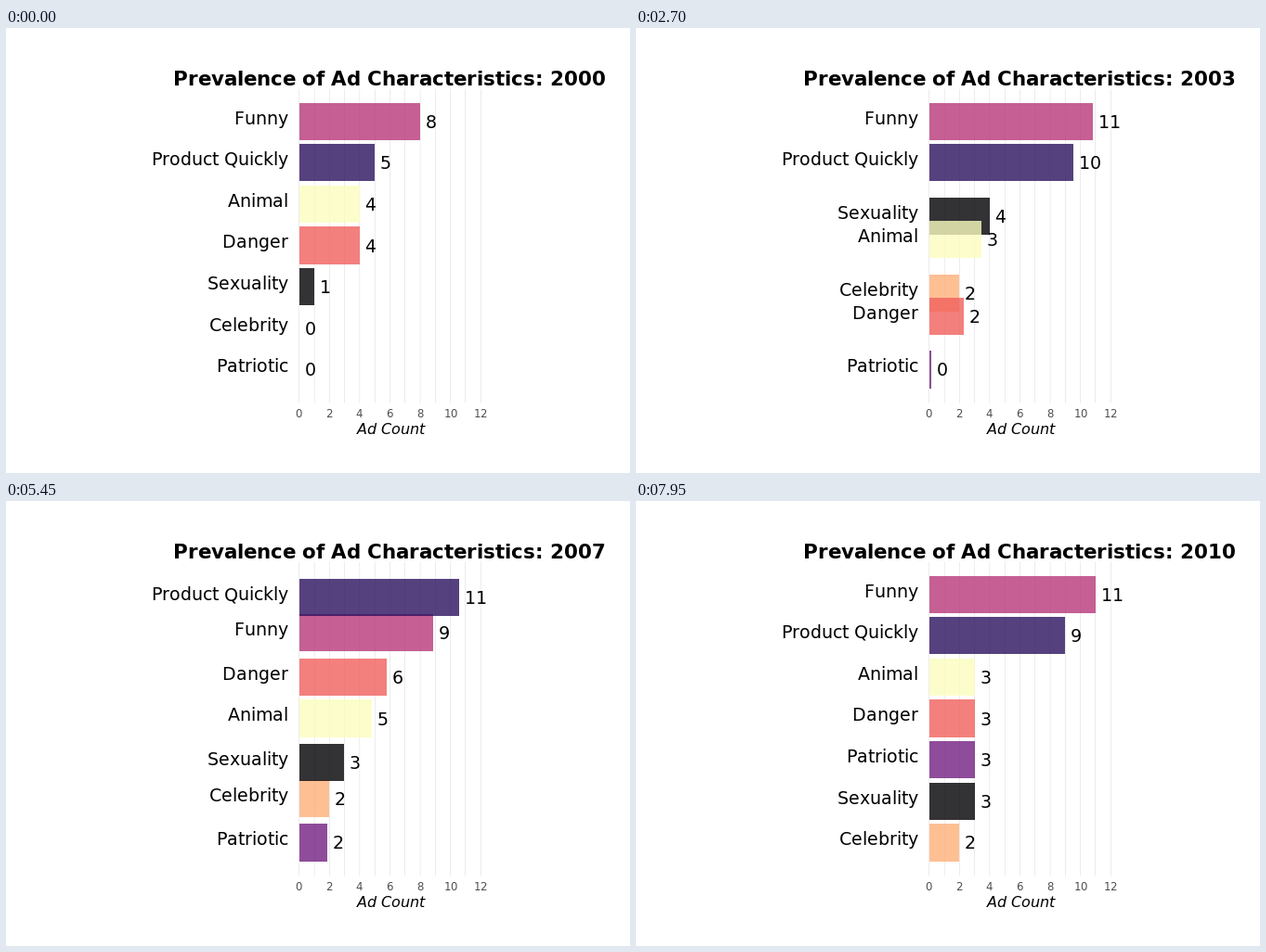
Recreate the animation shown at these times as a matplotlib script. Size 672x480 px, loop 8000 ms.

```python
import math

import matplotlib.pyplot as plt
from matplotlib.animation import FuncAnimation
from matplotlib.patches import Rectangle
from matplotlib.textpath import TextPath

plt.rcParams["font.family"] = "DejaVu Sans"

WIDTH, HEIGHT, DPI = 672, 480, 96
X0, UNIT = 315.8, 16.28            # zero of the count axis, pixels per ad
ROW1, ROW_STEP = 100.63, 44.64     # centre of the top row, row spacing
BAR_H = 0.9 * ROW_STEP
PANEL_TOP, PANEL_BOTTOM = 65.7, 404.5
LAST_TICK = 12
CYCLE, MOVE_START, MOVE_STEPS = 16, 3, 12
FIRST_YEAR = 2000

# Ads per year, listed from the dark to the light end of the colour map.
COUNTS = {
    "Sexuality": [1, 6, 6, 4, 4, 8, 2, 3, 4, 2, 3],
    "Product Quickly": [5, 4, 7, 10, 7, 8, 5, 11, 11, 12, 9],
    "Patriotic": [0, 1, 1, 0, 1, 0, 0, 2, 3, 4, 3],
    "Funny": [8, 10, 8, 11, 10, 11, 7, 9, 11, 11, 11],
    "Danger": [4, 4, 4, 2, 4, 1, 3, 6, 4, 7, 3],
    "Celebrity": [0, 6, 2, 2, 2, 6, 2, 2, 5, 2, 2],
    "Animal": [4, 3, 3, 3, 6, 6, 2, 5, 3, 5, 3],
}
YEARS = len(COUNTS["Funny"])


def ranking(year):
    """Row of every series: by count, ties in alphabetical order."""
    order = sorted(COUNTS, key=lambda name: (-COUNTS[name][year], name))
    return {name: row for row, name in enumerate(order)}


RANKS = [ranking(year) for year in range(YEARS)]

fig = plt.figure(figsize=(WIDTH / DPI, HEIGHT / DPI), dpi=DPI, facecolor="white")
ax = fig.add_axes([0, 0, 1, 1])
ax.set_xlim(0, WIDTH)
ax.set_ylim(HEIGHT, 0)
ax.axis("off")


class Label:
    """A line of text whose letters advance by whole pixels."""

    def __init__(self, slots, px, align=0, **style):
        self.px, self.align = px, align
        self.advances = {}
        self.glyphs = [ax.text(0, 0, "", fontsize=px * 72 / DPI, ha="left",
                               va="baseline", zorder=30, **style)
                       for _ in range(slots)]

    def advance(self, char):
        if char not in self.advances:
            font = self.glyphs[0].get_fontproperties()

            def right(text):
                return TextPath((0, 0), text, size=self.px, prop=font).get_extents().x1

            self.advances[char] = round(right(char + "|") - right("|"))
        return self.advances[char]

    def show(self, text, x, y):
        x = round(x - self.align * sum(map(self.advance, text)))
        for glyph, char in zip(self.glyphs, text.ljust(len(self.glyphs))):
            glyph.set_text(char.strip())
            # Just under half a pixel back, so side bearings round down.
            glyph.set_position((x - 0.49, round(y)))
            x += self.advance(char)


def mix(a, b, t):
    return a + (b - a) * t


for count in range(LAST_TICK + 1):
    x = X0 + count * UNIT
    ax.plot([x, x], [PANEL_TOP, PANEL_BOTTOM], color="#BEBEBE", lw=0.28 * 72 / DPI,
            snap=False, solid_capstyle="butt", zorder=1)
    if count % 2 == 0:
        Label(2, 11.73, 0.5, color="#4D4D4D").show(str(count), x, 420)

CENTRE = X0 + LAST_TICK / 2 * UNIT
Label(8, 16, 0.5, style="italic").show("Ad Count", CENTRE + 1, 438)

HEADING = "Prevalence of Ad Characteristics: "
title = Label(len(HEADING) + 4, 21.33, 0.5, weight="bold")

bars, names, values = {}, {}, {}
for i, name in enumerate(COUNTS):
    color = plt.cm.magma(i / (len(COUNTS) - 1))
    bars[name] = ax.add_patch(Rectangle((X0, 0), 0, BAR_H, facecolor=color,
                                        alpha=0.8, linewidth=0))
    names[name] = Label(len(name), 18.97, 1)
    values[name] = Label(2, 18.97)


def update(frame):
    year, step = divmod(frame, CYCLE)
    p = min(max((step - MOVE_START) / MOVE_STEPS, 0), 1)
    eased = (1 - math.cos(math.pi * p)) / 2
    nearest = year + (p >= 0.5)

    title.show(HEADING + str(FIRST_YEAR + nearest), CENTRE, 62)
    for name, counts in COUNTS.items():
        start, end = RANKS[year][name], RANKS[year + 1][name]
        y = ROW1 + ROW_STEP * mix(start, end, eased)
        length = UNIT * mix(counts[year], counts[year + 1], eased)
        bars[name].set(y=y - BAR_H / 2, width=length, zorder=2 + start)
        names[name].show(name, 304, y + 2.91)
        values[name].show(str(counts[nearest]), X0 + length + 6, y + 7)
    return list(bars.values())


anim = FuncAnimation(fig, update, frames=CYCLE * (YEARS - 1), interval=50,
                     repeat=True, repeat_delay=0, blit=False)
plt.show()
```
